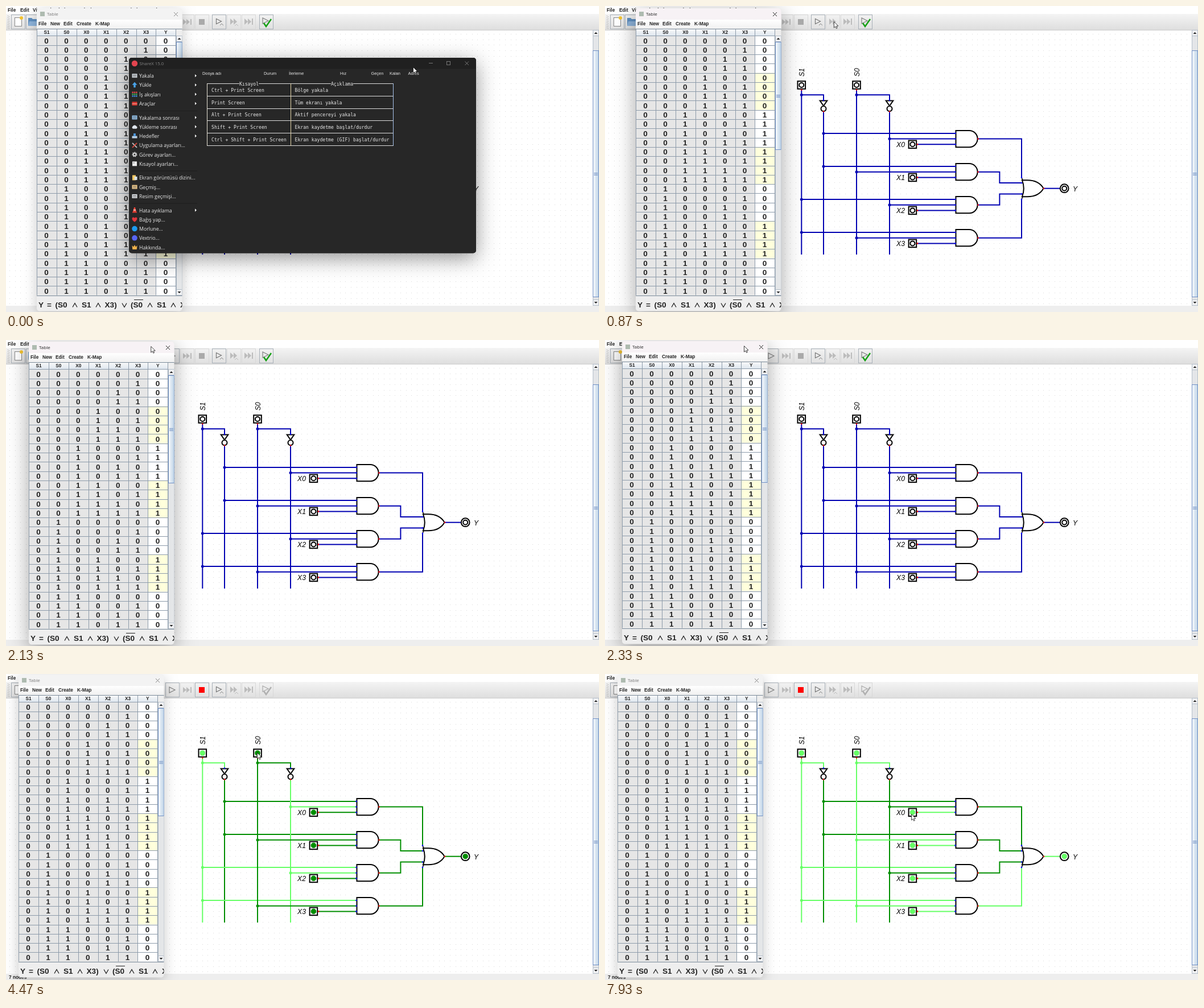
An HTML page with a canvas for the animation above (8 s loop, 1042 px wide and 538 px high).

```html
<!DOCTYPE html>
<html lang="en">
<head>
<meta charset="utf-8">
<title>Logic circuit simulation</title>
<style>
html, body { margin: 0; width: 100%; height: 100%; overflow: hidden; background: #fff; }
canvas { display: block; }
</style>
</head>
<body>
<canvas id="stage" width="1042" height="538"></canvas>
<script>
const c = document.getElementById('stage').getContext('2d');
const LOOP = 8000, STEP = 1000 / 15;
const SANS = '"Liberation Sans", Arial, sans-serif';
const UI = '"Open Sans", "Noto Sans", sans-serif';
const MONO = '"DejaVu Sans Mono", monospace';
const EDGE = '#7a8a99';

// When each thing happens, in ms
const FOCUS = 660, MINIMIZE = 716, PLAY = 2930;
const CLICKS = { S1: 3995, S0: 4660, X0: 5395, X1: 6130, X2: 6660, X3: 7128 };

// Pointer path: time, x, y
const PATH = [
  [0, 715, 107], [467, 740, 99], [667, 744, 96], [735, 744, 96], [867, 401, 27], [1067, 330, 17],
  [1267, 297, 14], [1600, 284, 11], [1733, 278, 9], [1867, 268, 12], [2333, 244, 10], [2533, 236, 9],
  [2600, 236, 9], [2867, 290, 26], [2933, 291, 27], [3200, 368, 168], [3467, 354, 141], [3667, 347, 138],
  [3995, 347, 138], [4467, 441, 138], [4867, 441, 138], [5333, 540, 242], [5467, 540, 242],
  [5733, 540, 292], [5933, 539, 301], [6200, 539, 301], [6600, 540, 358], [6667, 540, 358],
  [7133, 543, 414], [7200, 543, 414], [7333, 542, 418], [7400, 542, 418], [7600, 536, 362],
  [7800, 535, 272], [7933, 538, 246]
];

function pointer(t) {
  const i = PATH.findIndex(p => p[0] > t);
  if (i < 0) return PATH[PATH.length - 1].slice(1);
  const [t0, x0, y0] = PATH[i - 1], [t1, x1, y1] = PATH[i];
  const u = (t - t0) / (t1 - t0);
  return [x0 + (x1 - x0) * u, y0 + (y1 - y0) * u];
}

// y is the middle of the capital letters
function text(s, x, y, size, color = '#222', align = 'left', style = '', family = SANS) {
  c.font = `${style} ${size}px ${family}`;
  c.textAlign = align;
  c.fillStyle = color;
  c.fillText(s, x, y + size * 0.36);
}
const bold = (s, x, y, size = 8.3, align = 'left', color = '#222') => text(s, x, y, size, color, align, 'bold');

function rect(x, y, w, h, fill, stroke) {
  if (fill) { c.fillStyle = fill; c.fillRect(x, y, w, h); }
  if (stroke) { c.strokeStyle = stroke; c.lineWidth = 1; c.strokeRect(x + 0.5, y + 0.5, w - 1, h - 1); }
}

function line(points, color = '#000', width = 2) {
  c.beginPath();
  for (let i = 0; i < points.length; i += 2) c.lineTo(points[i], points[i + 1]);
  c.strokeStyle = color;
  c.lineWidth = width;
  c.stroke();
}

function poly(points, fill) {
  c.beginPath();
  for (let i = 0; i < points.length; i += 2) c.lineTo(points[i], points[i + 1]);
  c.closePath();
  c.fillStyle = fill;
  c.fill();
}

function disc(x, y, r, fill, stroke) {
  c.beginPath();
  c.arc(x, y, r, 0, 7);
  if (fill) { c.fillStyle = fill; c.fill(); }
  if (stroke) { c.strokeStyle = stroke; c.lineWidth = 2; c.stroke(); }
}

function gradient(x0, y0, x1, y1, from, to) {
  const g = c.createLinearGradient(x0, y0, x1, y1);
  g.addColorStop(0, from);
  g.addColorStop(1, to);
  return g;
}

function panel(x, y, w, h, fill, blur, alpha) {
  c.save();
  c.shadowColor = `rgba(0,0,0,${alpha})`;
  c.shadowBlur = blur;
  c.shadowOffsetY = blur / 4;
  c.beginPath();
  c.roundRect(x, y, w, h, 5);
  c.fillStyle = fill;
  c.fill();
  c.restore();
}

function scrollbar(x, y, w, h, top, bottom) {
  rect(x, y, w, h, '#e4e6e8', '#b5bfca');
  rect(x, y, w, 11, '#f0f1f3', '#b5bfca');
  rect(x, y + h - 11, w, 11, '#f0f1f3', '#b5bfca');
  const m = x + w / 2, b = y + h;
  poly([m - 3, y + 7, m + 3, y + 7, m, y + 4], '#222');
  poly([m - 3, b - 7, m + 3, b - 7, m, b - 4], '#222');
  rect(x, top, w, bottom - top, gradient(x, 0, x + w, 0, '#fdfeff', '#b8cfe5'), '#6f8fc4');
  for (let i = -1; i < 2; i++) rect(x + 2, Math.round((top + bottom) / 2) + i * 2, w - 4, 1, '#7d9ac8');
}

function toolButton(x, enabled) {
  rect(x - 13, 15, 25, 26, gradient(0, 15, 0, 41, '#f2f2f2', '#e0e0e0'), enabled ? '#a8b0b8' : '#d8d8d8');
}

function triangle(x, y, r, color, width = 1.2) {
  line([x - r, y - r, x + r, y, x - r, y + r, x - r, y - r, x + r, y], color, width);
}

function mainWindow(running) {
  rect(0, 0, 1042, 538, '#fff');
  c.fillStyle = '#d8d8d8';
  for (let x = 6.6; x < 1030; x += 9.675)
    for (let y = 49.6; y < 526; y += 9.675) c.fillRect(Math.floor(x), Math.floor(y), 1, 1);

  [['File', 3], ['Edit', 25], ['View', 47], ['Simulation', 72], ['Analysis', 121], ['Components', 156],
   ['Windows', 211], ['Help', 253]].forEach(([s, x]) => bold(s, x, 7));
  rect(0, 14, 1042, 28, gradient(0, 14, 0, 42, '#f4f4f4', '#dedede'));
  rect(0, 42, 1042, 1, '#ccc');
  for (let y = 17; y < 40; y += 3) { rect(3, y, 1, 1, '#999'); rect(5, y + 1, 1, 1, '#999'); }

  toolButton(22, true);
  rect(15, 20, 13, 16, '#fff', '#888');
  disc(27, 21, 3, '#f2c230');
  toolButton(48, true);
  poly([39, 21, 45, 21, 47, 23, 56, 23, 56, 35, 39, 35], '#5f8fc0');
  poly([41, 27, 58, 27, 55, 35, 39, 35], '#8db3da');

  toolButton(293, true);
  toolButton(319, false);
  toolButton(345, running);
  toolButton(375, true);
  toolButton(401, false);
  toolButton(427, false);
  toolButton(458, !running);
  triangle(292, 28, 5, '#808080');
  const off = '#bcbcbc';
  poly([311, 23, 311, 33, 317, 28], off);
  poly([317, 23, 317, 33, 323, 28], off);
  rect(324, 23, 2, 10, off);
  rect(339, 23, 10, 10, running ? '#f00' : '#aaa');
  triangle(374, 27, 4.5, '#777');
  line([376, 34, 379, 31, 382, 34], '#888', 1);
  poly([394, 22, 394, 33, 400, 27.5], off);
  poly([400, 22, 400, 33, 406, 27.5], off);
  line([402, 35, 405, 32, 408, 35], off, 1);
  poly([419, 22, 419, 33, 425, 27.5], off);
  poly([425, 22, 425, 33, 431, 27.5], off);
  rect(432, 22, 2, 11, off);
  triangle(456, 26, 5, running ? '#aaa' : '#808080');
  line([453, 30, 457, 36, 466, 23], running ? '#b0b0b0' : '#16a016', 2.5);

  rect(0, 527, 1042, 11, '#eee');
  if (running) bold('7 nodes', 5, 533);
  scrollbar(1031, 42, 11, 485, 78, 512);
}

function circuit(t, running) {
  const on = name => t >= CLICKS[name];
  const wireColor = v => running ? (v ? '#66ff66' : '#008e00') : '#0000b2';
  const wire = (v, ...paths) => paths.forEach(p => line(p, wireColor(v)));
  const dot = (v, ...at) => at.forEach(([x, y]) => disc(x, y, 2.5, wireColor(v)));
  const pinIn = (x, y) => disc(x, y, 1.3, '#0000ff');
  const pinOut = (x, y) => disc(x, y, 1.3, '#ff0000');
  const lamp = (x, y, v) => running ? disc(x, y, 4.8, wireColor(v)) : disc(x, y, 4, null, '#000');

  const s1 = on('S1'), s0 = on('S0');
  const xs = ['X0', 'X1', 'X2', 'X3'].map(on);
  const gates = [!s1 && !s0, !s1 && s0, s1 && !s0, s1 && s0].map((sel, i) => sel && xs[i]);
  const y = gates.some(Boolean);
  const rows = [233.6, 291.7, 349.7, 407.7];

  // Select lines, their inverses and their branches to the gates
  [[345.3, 384, s1, [340, 398], [224, 282]],
   [442, 500, s0, [291.7, 407.7], [233.6, 349.7]]].forEach(([x, n, v, taps, inverse]) => {
    wire(v, [x, 147, x, 437], [x, 156.3, n, 156.3, n, 166]);
    wire(!v, [n, 185, n, 437]);
    taps.forEach(b => { wire(v, [x, b, 616, b]); dot(v, [x, b]); });
    inverse.forEach(b => { wire(!v, [n, b, 616, b]); dot(!v, [n, b]); });
    dot(v, [x, 156.3]);
    line([n - 6.3, 166.5, n + 6.3, 166.5, n, 175.5, n - 6.3, 166.5, n, 166.5]);
    disc(n, 180.6, 4.5, '#fff', '#000');
    pinIn(n, 165.5);
    pinOut(n, 185.5);
    c.strokeStyle = '#000';
    c.strokeRect(x - 6.8, 132.2, 13.6, 13.6);
    lamp(x, 139, v);
    pinOut(x, 147.5);
    c.save();
    c.translate(x + 0.5, 124);
    c.rotate(-Math.PI / 2);
    text(x < 400 ? 'S1' : 'S0', 0, 0, 12, '#000', 'left', 'italic');
    c.restore();
  });

  const outs = [
    [732, 233.6, 732, 301.5],
    [693.4, 291.7, 693.4, 311, 734, 311],
    [693.4, 349.7, 693.4, 330.5, 734, 330.5],
    [732, 407.7, 732, 340]
  ];
  rows.forEach((g, i) => {
    const b = g + 9.7;
    wire(xs[i], [549, b, 616, b]);
    wire(gates[i], [655, g, ...outs[i]]);
    c.beginPath();
    c.moveTo(616.5, g - 14.6);
    c.lineTo(640, g - 14.6);
    c.arc(640, g, 14.6, -Math.PI / 2, Math.PI / 2);
    c.lineTo(616.5, g + 14.6);
    c.closePath();
    c.fillStyle = '#fff';
    c.fill();
    c.strokeStyle = '#000';
    c.lineWidth = 2;
    c.stroke();
    [g - 9.7, g, b].forEach(p => pinIn(615.5, p));
    pinOut(655.5, g);
    c.strokeRect(533.6, b - 6.8, 13.6, 13.6);
    lamp(540.4, b, xs[i]);
    pinOut(549, b);
    text('X' + i, 527, b + 0.7, 12.2, '#000', 'right', 'italic');
  });

  wire(y, [771, 320.7, 799, 320.7]);
  line([732, 301.5, 734, 306.3], '#000', 1.5);
  line([732, 340, 734, 335.2], '#000', 1.5);
  c.lineWidth = 2;
  c.strokeStyle = '#000';
  c.fillStyle = '#fff';
  const or = new Path2D('M733 306.3H742C757 306.3 766 313 770.5 320.7C766 328.5 757 335.2 742 335.2H733Q738.5 320.7 733 306.3Z');
  c.fill(or);
  c.stroke(or);
  [301.5, 311, 330.5, 340].forEach(p => pinIn(732, p));
  pinOut(771, 320.7);
  disc(807.2, 320.7, 7.4, '#fff', '#000');
  lamp(807.2, 320.7, y);
  text('Y', 822, 321.5, 12.2, '#000', 'left', 'italic');
}

function tableWindow(t, x, y) {
  const active = t >= FOCUS && t < PLAY;
  c.save();
  c.translate(x, y);
  panel(0, 0, 255.5, 532.5, '#eee', active ? 36 : 22, active ? 0.36 : 0.22);
  c.beginPath();
  c.roundRect(0, 0, 255.5, 532.5, 5);
  c.clip();

  rect(0, 0, 256, 20, active ? '#f7f2f5' : '#f3f3f3');
  rect(6, 6, 8, 8, '#aebbb0');
  text('Table', 18, 10.5, 8, active ? '#222' : '#777', 'left', '', UI);
  const hover = t >= 1130 && t < 1795;
  if (hover) rect(234, 0, 22, 20, t < 1700 ? '#c42b1c' : '#c4504a');
  const cross = hover ? '#e8b0a8' : active ? '#222' : '#888';
  line([241, 7, 248, 14], cross, 1);
  line([248, 7, 241, 14], cross, 1);

  rect(0, 20, 256, 16, gradient(0, 20, 0, 36, '#fff', '#f0f0f0'));
  [['File', 3], ['New', 24], ['Edit', 47], ['Create', 70], ['K-Map', 103]].forEach(([s, a]) => bold(s, a, 27.5));

  const W = 34.9, H = 16.296, TOP = 48.4;
  rect(0, 36, 245, 12, gradient(0, 36, 0, 48, '#fafafa', '#dfe7ef'));
  rect(0, TOP, 245, H * 28, '#e6e6e6');
  for (let r = 0; r < 28; r++) {
    const bits = [32, 16, 8, 4, 2, 1].map(b => r & b ? 1 : 0);
    const values = [...bits, bits[2 + bits[0] * 2 + bits[1]]];
    rect(6 * W, TOP + r * H, W, H, r & 4 ? '#ffffdc' : '#fff');
    values.forEach((v, k) => bold(v, (k + 0.5) * W - 0.4, TOP + (r + 0.5) * H + 0.2, 13.5, 'center'));
  }
  ['S1', 'S0', 'X0', 'X1', 'X2', 'X3', 'Y'].forEach((s, k) => bold(s, (k + 0.5) * W, 42.3, 8.3, 'center'));
  for (let k = 0; k < 8; k++) rect(Math.round(k * W), 36, 1, 468.5, '#8d9baa');
  for (let r = 0; r < 29; r++) rect(0, Math.round(TOP + r * H), 245, 1, '#8d9baa');
  rect(0, 36, 256, 1, EDGE);
  scrollbar(245, 48, 11, 457, 59, 249);
  rect(0, 505, 256, 1, EDGE);

  [['Y', 3], ['=', 18], ['(S0', 32.5], ['S1', 79], ['X3)', 119.5], ['(S0', 165], ['S1', 211], ['X', 252]]
    .forEach(([s, a]) => bold(s, a, 521, 13.6));
  rect(171, 512, 16, 1, '#222');
  [[67, 1], [108, 1], [154, -1], [199, 1], [240, 1]].forEach(([a, d]) =>
    line([a - 4, 522 + 3.5 * d, a, 522 - 3.5 * d, a + 4, 522 + 3.5 * d], '#222', 1.3));
  c.restore();
}

// Menu icons, drawn around (0, 0) in a box of about nine pixels
const box = color => () => { rect(-4.5, -3.5, 9, 7, color); rect(-3, -1.5, 6, 1, '#555'); rect(-3, 1, 6, 1, '#777'); };
const ball = color => () => disc(0, 0, 4.8, color);
const shape = (d, color) => () => { c.fillStyle = color; c.fill(new Path2D(d)); };
const ICONS = [
  box('#c9d0d6'),
  shape('M0-5L4.5 0H1.7V4.5H-1.7V0H-4.5Z', '#4aa3e8'),
  () => ['#e8484a', '#45b058', '#3f8fe0'].forEach((k, r) => [-4.5, -1.2, 2.1].forEach(x => rect(x, r * 3.3 - 4.5, 2.4, 2.4, k))),
  () => { rect(-4.5, -3, 9, 6.5, '#d8352f'); rect(-4.5, 0, 9, 1, '#f0c0b0'); },
  box('#8fc0ea'),
  shape('M-3 3.5A2.5 2.5 0 0 1-3-1A3.4 3.4 0 0 1 3-1A2.4 2.4 0 0 1 3 3.5Z', '#dfe6ee'),
  () => { rect(-4.5, 0, 9, 4, '#b9cfe4'); rect(-2, -4.5, 4, 5, '#4c94d8'); },
  () => { line([-4, -4, 4, 4], '#c8c8c8', 1.7); line([4, -4, -4, 4], '#d8473c', 1.7); },
  () => { c.setLineDash([1.8, 1.3]); disc(0, 0, 3.5, null, '#ccc'); c.setLineDash([]); disc(0, 0, 2.4, null, '#ccc'); },
  () => { rect(-4, -4, 8, 8, '#ececec'); rect(-2.5, -2.5, 2, 2, '#999'); },
  () => { rect(-4, -4.5, 6, 9, '#f0c660'); rect(-0.5, -2, 5, 6, '#d8e2ea'); },
  box('#f0c987'),
  box('#d8dce0'),
  () => { poly([-1, -5, 1, -5, 3.2, 3, -3.2, 3], '#e8483c'); rect(-2, -1, 4, 1.3, '#fff'); rect(-4, 3, 8, 1.5, '#d8392f'); },
  shape('M0 4.5C-8-1-3.5-6.5 0-2.5C3.5-6.5 8-1 0 4.5Z', '#e2353b'),
  ball('#1d9bf0'),
  ball('#5865f2'),
  shape('M-4.5-3L-2-.5L0-4L2-.5L4.5-3L3.7 4H-3.7Z', '#eeb04a')
];
const MENU = ['Yakala', 'Yükle', 'İş akışları', 'Araçlar', 'Yakalama sonrası', 'Yükleme sonrası', 'Hedefler',
  'Uygulama ayarları...', 'Görev ayarları...', 'Kısayol ayarları...', 'Ekran görüntüsü dizini...', 'Geçmiş...',
  'Resim geçmişi...', 'Hata ayıklama', 'Bağış yap...', 'Morlune...', 'Vextrio...', 'Hakkında...'];
const KEYS = [['Ctrl + Print Screen', 'Bölge yakala'], ['Print Screen', 'Tüm ekranı yakala'],
  ['Alt + Print Screen', 'Aktif pencereyi yakala'], ['Shift + Print Screen', 'Ekran kaydetme başlat/durdur'],
  ['Ctrl + Shift + Print Screen', 'Ekran kaydetme (GIF) başlat/durdur']];

function captureWindow(t) {
  const u = Math.max(0, (t - MINIMIZE) / 100);
  if (u >= 1) return;
  c.save();
  c.globalAlpha = 1 - 0.85 * u ** 3;
  c.translate(521 + 33 * u * u, 262.5 + 104 * u * u);
  const s = 1 - 0.33 * u * u;
  c.scale(s, s);
  c.translate(-521, -262.5);

  panel(216, 91, 610, 343.5, '#272727', 36, 0.42);
  c.beginPath();
  c.roundRect(216, 91, 610, 343.5, 5);
  c.fillStyle = '#272727';
  c.fill();
  c.save();
  c.clip();
  rect(216, 91, 610, 19.5, '#202020');
  c.restore();
  disc(226, 101, 5.2, '#e2444f');
  text('ShareX 15.0', 234.5, 101, 7.8, '#858585', 'left', '', UI);
  const dim = '#777';
  if (t < FOCUS) line([743, 100.5, 750, 100.5], dim, 1);
  rect(774, 97, 7, 7, null, dim);
  line([806.5, 97.5, 813, 104], dim, 1);
  line([813, 97.5, 806.5, 104], dim, 1);

  MENU.forEach((label, i) => {
    const y = 122.6 + i * 16.27 + 8.3 * ((i > 3) + (i > 9) + (i > 12));
    c.save();
    c.translate(226, y);
    ICONS[i]();
    c.restore();
    text(label, 234, y + 0.4, 8.75, '#e8e8e8', 'left', '', UI);
    if (i < 7 || i === 13) poly([332, y - 2.7, 332, y + 2.7, 335, y], '#eee');
  });
  [184, 289.5, 346.5].forEach(y => rect(221, y, 115, 1, '#1f1f1f'));

  [['Dosya adı', 345], ['Durum', 453], ['İlerleme', 497], ['Hız', 587], ['Geçen', 641.5], ['Kalan', 674], ['Adres', 706.5]]
    .forEach(([s, x]) => text(s, x, 118, 7.4, '#e8e8e8'));

  for (let r = 0; r < 6; r++) rect(353, Math.round(136.3 + r * 21.7), 328, 1, '#dcdcdc');
  rect(353, 136, 1, 110, '#e6e0d4');
  rect(500, 136, 1, 110, '#e4d4a8');
  rect(680, 136, 1, 110, '#a6c2ea');
  [['Kısayol', 427], ['Açıklama', 590.5]].forEach(([s, x]) => {
    rect(x - s.length * 2.45, 132, s.length * 4.9, 10, '#272727');
    text(s, x, 137.5, 8.12, '#e8e8e8', 'center', '', MONO);
  });
  KEYS.forEach(([key, what], r) => {
    const y = 148 + r * 21.75;
    text(key, 361, y, 8.12, '#e8e8e8', 'left', '', MONO);
    text(what, 507.5, y, 8.12, '#e8e8e8', 'left', '', MONO);
  });
  c.restore();
}

function arrow([x, y]) {
  c.save();
  c.translate(x, y);
  const p = new Path2D('M.5.5V11L3 8.8L4.6 12.3L6.3 11.5L4.8 8.1L8 7.9Z');
  c.fillStyle = '#fff';
  c.fill(p);
  c.strokeStyle = '#111';
  c.lineWidth = 0.8;
  c.stroke(p);
  c.restore();
}

function draw(t) {
  const running = t >= PLAY;
  const grab = pointer(Math.min(Math.max(t, 1867), 2533));
  mainWindow(running);
  circuit(t, running);
  tableWindow(t, Math.round(grab[0] - 214), Math.round(grab[1] - 8));
  captureWindow(t);
  arrow(pointer(t));
}

function tick() {
  const t = performance.now() % LOOP;
  draw(Math.floor((t + 5) / STEP) * STEP % LOOP);
  requestAnimationFrame(tick);
}
tick();
</script>
</body>
</html>
```
